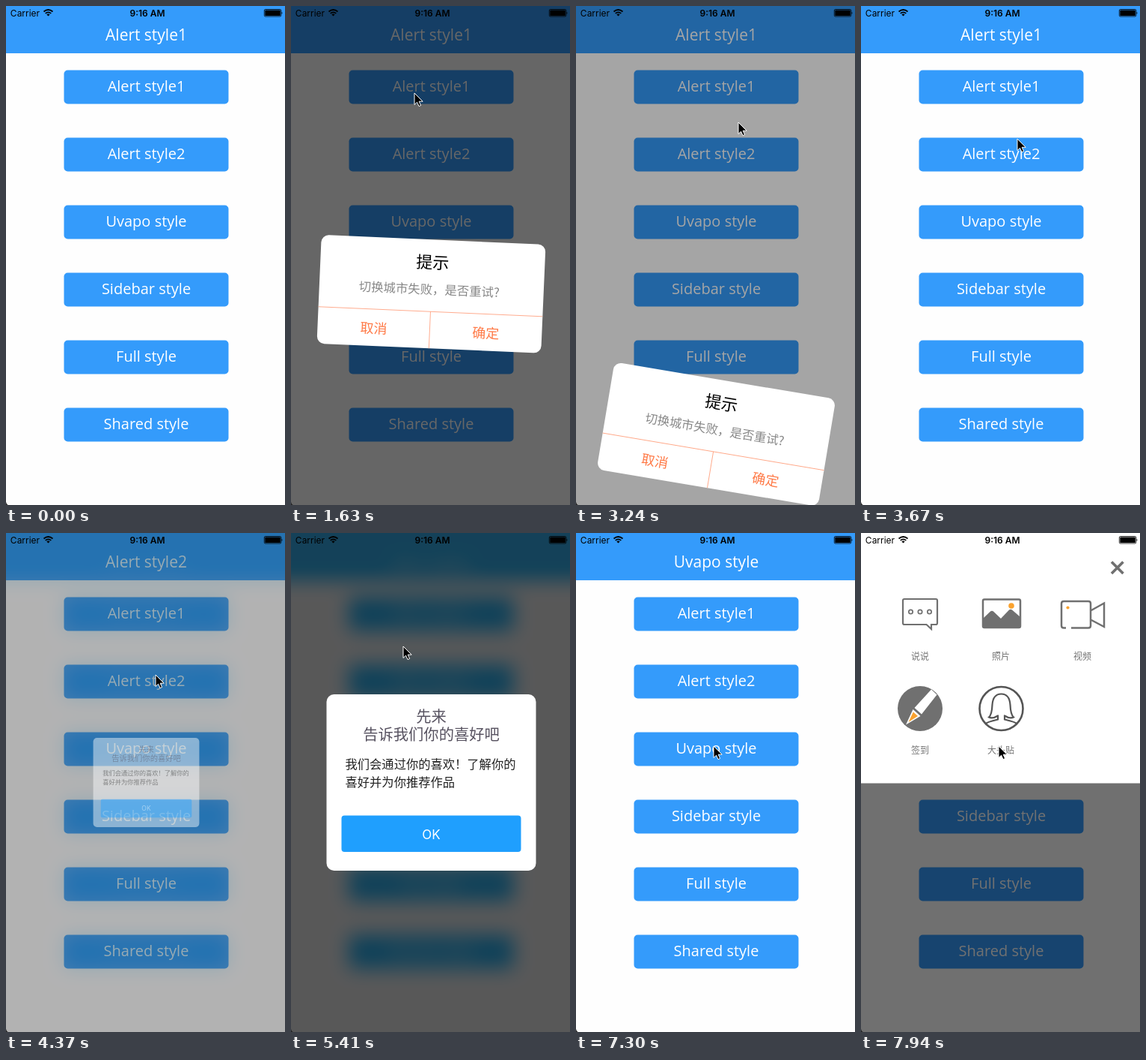
Write an HTML page that moves like this. It is 373 px wide and 665 px high and loops after 8000 ms.

```html
<!DOCTYPE html>
<html lang="en">
<head>
<meta charset="utf-8">
<title>Popup styles</title>
<style>
html, body { margin: 0; width: 100%; height: 100%; overflow: hidden; background: #fefefe; }
svg { display: block; width: 373px; height: 665px; }
text { text-anchor: middle; font-family: "Noto Sans CJK SC", "Noto Sans CJK", sans-serif; }
.ui { font-family: "Open Sans", "Noto Sans", sans-serif; fill: #fff; font-size: 20px; }
.bar text { font: 12px Inter, Roboto, sans-serif; }
.bar .time { font-weight: 600; }
.blue { fill: #349bfb; }
.orange { fill: #ff7a47; font-size: 18px; }
.rule { stroke: #ff9a76; stroke-width: .8; }
.head { font-size: 20.3px; font-weight: 500; fill: #575260; }
.body text { font-size: 16.3px; fill: #222; text-anchor: start; }
.label text { font-size: 12px; fill: #757575; }
.line { fill: none; stroke: #707070; stroke-width: 2.5; }
.grey { fill: #707070; }
.sun { fill: #faa22f; }
</style>
</head>
<body>
<svg viewBox="0 0 373 665">
  <defs>
    <filter id="soft" filterUnits="userSpaceOnUse" x="-60" y="-60" width="493" height="785" color-interpolation-filters="sRGB">
      <feGaussianBlur stdDeviation="13"/>
      <feColorMatrix type="saturate" values="1.8"/>
    </filter>
  </defs>

  <g id="page">
    <rect x="-60" y="-60" width="493" height="785" fill="#fefefe"/>
    <rect class="blue" x="-60" y="-60" width="493" height="123"/>
    <text id="title" class="ui" x="187.5" y="46" style="font-size:21px"></text>
    <g id="buttons"></g>
  </g>

  <g id="blur">
    <use href="#page" filter="url(#soft)"/>
    <rect width="373" height="665" fill="#1c1c1c" fill-opacity=".73"/>
  </g>
  <rect id="dim" width="373" height="665"/>

  <g id="ask">
    <rect x="-150" y="-72.5" width="300" height="145" rx="10" fill="#fff"/>
    <text y="-34" font-size="22">提示</text>
    <text x="-3" y="0" font-size="16.4" fill="#888">切换城市失败，是否重试?</text>
    <path class="rule" d="M-150 23.5H150M0 23.5V72.5"/>
    <text class="orange" x="-75" y="55.5">取消</text>
    <text class="orange" x="75" y="55.5">确定</text>
  </g>

  <g id="tell">
    <rect x="-140" y="-117.5" width="280" height="235" rx="10" fill="#fff"/>
    <text class="head" y="-80.5">先来</text>
    <text class="head" y="-56.5">告诉我们你的喜好吧</text>
    <g class="body">
      <text x="-115" y="-18.5">我们会通过你的喜欢！了解你的</text>
      <text x="-115" y="5.5">喜好并为你推荐作品</text>
    </g>
    <rect x="-120" y="44" width="240" height="48.5" rx="4" fill="#1f9ffe"/>
    <text class="ui" y="75" style="font:400 17px Inter,sans-serif">OK</text>
  </g>

  <g id="panel">
    <rect y="-40" width="373" height="373.5" fill="#fff"/>
    <path class="line" style="stroke-width:3.6" d="M335 38.5l15.5 15.5M350.5 38.5L335 54"/>
    <g class="line" style="stroke-width:2.2">
      <path d="M58 88H100Q102 88 102 90V120Q102 122 100 122H94V128L87.5 122H58Q56 122 56 120V90Q56 88 58 88Z"/>
      <circle cx="66.5" cy="105" r="2.7" stroke-width="1.7"/>
      <circle cx="79" cy="105" r="2.7" stroke-width="1.7"/>
      <circle cx="91.5" cy="105" r="2.7" stroke-width="1.7"/>
    </g>
    <rect class="line" x="163" y="88.5" width="50" height="37.5" rx="2"/>
    <path class="grey" d="M163 114L173 104.5Q175 103 177 104.5L187 114L198 102.5Q200 101 202 102.5L213 112V126H163Z"/>
    <circle class="sun" cx="201" cy="97" r="3.8"/>
    <path class="line" d="M274 126.5H271Q268 126.5 268 123.5V94Q268 91 271 91H304Q307 91 307 94V123.5Q307 126.5 304 126.5H281M307 103.5L325 93.5V125L307 115.5"/>
    <circle class="sun" cx="276.5" cy="99.5" r="2.1"/>
    <circle class="grey" cx="79" cy="234" r="30"/>
    <path fill="#fff" d="M94 208.5L101.5 215.5L81 241.5L71.5 233ZM69.5 235L79.5 244L60 255.5Z"/>
    <path class="sun" d="M69.8 238.5L76 244L63.5 252Z"/>
    <g class="line" style="stroke:#555;stroke-width:2.6">
      <circle cx="187.5" cy="234" r="29"/>
      <path stroke-width="2.2" d="M183 243.5Q176 248 171 245.5Q175 242 175.5 229Q176.5 214.5 187.5 214.5Q198.5 214.5 199.5 229Q200 242 204 245.5Q199 248 192 243.5M183 242.5V248.5Q168 252 166 254.5M192 242.5V248.5Q207 252 209 254.5"/>
    </g>
    <g class="label">
      <text x="79" y="168.5">说说</text>
      <text x="187" y="168.5">照片</text>
      <text x="296" y="168.5">视频</text>
      <text x="79" y="293.5">签到</text>
      <text x="187" y="293.5">大头贴</text>
    </g>
  </g>

  <g class="bar">
    <text x="25.5" y="13.5">Carrier</text>
    <path fill="none" stroke="#000" stroke-width="1.7" d="M50.5 7.5Q56.5 2.5 62.5 7.5M52.7 9.9Q56.5 6.8 60.3 9.9"/>
    <path d="M54.3 11.3Q56.5 9.8 58.7 11.3L56.5 13.6Z"/>
    <text class="time" x="189" y="13.5">9:16 AM</text>
    <rect x="345.3" y="4.5" width="22.5" height="9.5" rx="1.5" fill="none" stroke="#000" stroke-width=".8"/>
    <rect x="346.3" y="5.5" width="20.5" height="7.5" rx=".6"/>
    <path d="M368.5 7.5Q370.4 9.3 368.5 11.1Z"/>
  </g>
  <path d="M0 661Q.5 664 3 665H0Z" fill="#222"/>
  <path id="cursor" d="M0 0V15.5L3.6 12.2L6 17.6L8.6 16.5L6.2 11.2H11.2Z" stroke="#fff"/>
</svg>

<script>
const $ = id => document.getElementById(id);
const LOOP = 8000, CX = 187.5, CY = 332.5;
const names = ['Alert style1', 'Alert style2', 'Uvapo style', 'Sidebar style', 'Full style', 'Shared style'];

$('buttons').innerHTML = names.map((name, i) => `
  <rect class="blue" x="77.5" y="${85.5 + 90 * i}" width="220" height="45" rx="5"/>
  <text class="ui" x="${CX}" y="${114.3 + 90 * i}">${name}</text>`).join('');

// Cursor stops: time, x, y
const stops = [
  [480, 326, 79], [700, 232, 111], [860, 176, 119], [950, 165, 116],
  [2050, 165, 116], [2230, 181, 133], [2530, 217, 155],
  [3500, 217, 155], [3670, 209, 177], [3840, 200, 189],
  [5130, 200, 189], [5410, 150, 151],
  [6400, 150, 151], [6540, 194, 242], [6830, 184, 284], [LOOP, 184, 284]
];

const clamp = v => Math.min(1, Math.max(0, v));
const ease = (t, start, length) => {
  const x = clamp((t - start) / length);
  return x * x * (3 - 2 * x);
};
// Underdamped spring from 0 to 1
const spring = ms => {
  if (ms <= 0) return 0;
  const s = ms / 1000;
  return 1 - Math.exp(-10.5 * s) * (Math.cos(14 * s) + .75 * Math.sin(14 * s));
};
const show = (el, on) => { el.style.display = on ? '' : 'none'; };
const move = (el, value) => el.setAttribute('transform', value);

function cursorAt(t) {
  const i = stops.findIndex(s => s[0] > t);
  const [t0, x0, y0] = stops[i - 1], [t1, x1, y1] = stops[i];
  const k = (t - t0) / (t1 - t0);
  return `translate(${x0 + (x1 - x0) * k} ${y0 + (y1 - y0) * k})`;
}

function draw(t) {
  const title = names[t < 4260 ? 0 : t < 7300 ? 1 : 2];
  if ($('title').textContent !== title) $('title').textContent = title;

  show($('cursor'), t >= 480);
  if (t >= 480) move($('cursor'), cursorAt(t));

  // Drop in with a swing, fall out below
  const drop = t < 1480 ? 0 : spring(t - 1425);
  const fall = ease(t, 2890, 800);
  show($('ask'), drop > 0 && fall < 1);
  move($('ask'), `translate(${CX} ${CY + 575 * (drop - 1) + 583 * fall}) rotate(${28 * (drop - 1) + 23.3 * fall})`);

  // Grow from a tenth over the blurred page, shrink back; each part fades on its own
  const grow = spring(t - 4299), shrink = ease(t, 5780, 800);
  const size = grow * (1 - shrink), alpha = clamp(size);
  show($('tell'), alpha > 0);
  show($('blur'), alpha > 0);
  move($('tell'), `translate(${CX} ${CY}) scale(${.1 + .9 * size})`);
  $('tell').setAttribute('fill-opacity', alpha);
  $('blur').setAttribute('opacity', alpha);

  const slide = ease(t, 7300, 640);
  show($('panel'), slide > 0);
  move($('panel'), `translate(0 ${-334 * (1 - slide)})`);

  $('dim').setAttribute('opacity', .595 * clamp(drop) * (1 - fall) + .557 * slide);
}

const begin = performance.now();
function tick() {
  draw((performance.now() - begin) % LOOP);
  requestAnimationFrame(tick);
}
tick();
</script>
</body>
</html>
```
